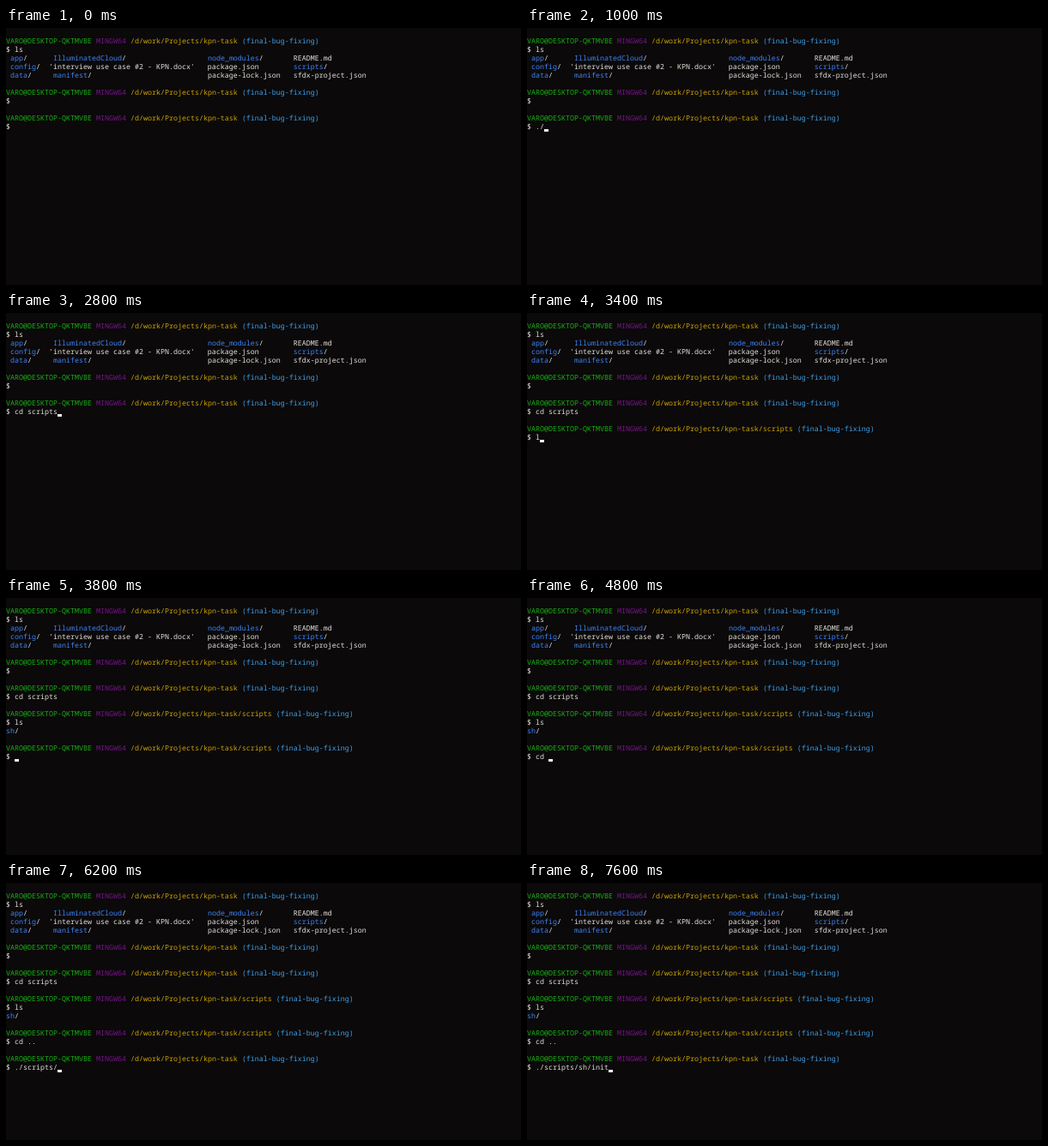
An HTML page that plays this animation: 600 px wide and 300 px high, repeating every 8000 ms.

```html
<!DOCTYPE html>
<html lang="en">
<head>
<meta charset="utf-8">
<title>Terminal session</title>
<style>
  html, body { margin: 0; width: 100%; height: 100%; overflow: hidden; background: #0b090a; }
  #term {
    position: absolute; left: 0; top: 11px; width: 600px; height: 289px; overflow: hidden;
    color: #e4e0da;
    font: 8.3333px/10px "Noto Sans Mono", "DejaVu Sans Mono", monospace;
    font-variant-ligatures: none;
    text-rendering: geometricPrecision;
    white-space: pre;
  }
  .user { color: #17b012; }
  .sys { color: #78158a; }
  .path { color: #cba406; }
  .branch { color: #409ee4; }
  .dir { color: #3f84f4; }
  #cursor { position: absolute; width: 5px; height: 3px; background: #f2f2f2; }
</style>
</head>
<body>
<div id="term"><div id="cursor"></div></div>
<script>
const STEP = 200, CELL = 5, ROW = 10;
const HOME = '/d/work/Projects/kpn-task';
const term = document.getElementById('term');
const cursor = document.getElementById('cursor');

const paint = (cls, text) => `<span class="${cls}">${text}</span>`;
const dir = (name, width = 0) => paint('dir', name) + '/'.padEnd(width - name.length);
const head = path => [
  paint('user', 'VARO@DESKTOP-QKTMVBE'), paint('sys', 'MINGW64'),
  paint('path', path), paint('branch', '(final-bug-fixing)')
].join(' ') + '\n';

const listing = [
  ' ' + dir('app', 10) + dir('IlluminatedCloud', 36) + dir('node_modules', 20) + 'README.md',
  ' ' + dir('config', 9) + "'interview use case #2 - KPN.docx'".padEnd(37) + 'package.json'.padEnd(20) + dir('scripts'),
  ' ' + dir('data', 10) + dir('manifest', 36) + 'package-lock.json'.padEnd(20) + 'sfdx-project.json'
].join('\n');

// Each prompt: text above the input, its row, and the input per step ("_" is the cursor).
const prompts = [
  {
    row: 10,
    before: head(HOME) + '$ ls\n' + listing + '\n\n' + head(HOME) + '$\n\n' + head(HOME),
    keys: ['', '_', '', '_', '._', './_', './s_', './sc_', './scr_', './scr',
           './_', 'c_', 'cd s_', 'cd scri_', 'cd scripts_']
  },
  { row: 13, before: '\n' + head(HOME + '/scripts'), keys: ['', '_', 'l_'], final: 'ls' },
  {
    row: 17,
    before: dir('sh') + '\n\n' + head(HOME + '/scripts'),
    keys: ['', '_', '', '_', 'c_', 'cd_', 'cd _', 'cd ._', 'cd .._']
  },
  {
    row: 20,
    before: '\n' + head(HOME),
    keys: ['', './_', './scr_', './script_', './scripts/_', './scripts/_',
           './scripts/s_', './scripts/sh_', './scripts/sh/_', './scripts/sh/i_',
           './scripts/sh/in_', './scripts/sh/init_', './scripts/sh/init_']
  }
];

let total = 0;
for (const p of prompts) {
  p.start = total;
  total += p.keys.length;
  p.final ??= p.keys.at(-1).replace('_', '');
  p.box = document.createElement('div');
  p.box.innerHTML = p.before + '$ <span></span>\n';
  p.input = p.box.lastElementChild;
  term.append(p.box);
}

function show(step) {
  for (const p of prompts) {
    const i = step - p.start;
    const active = i >= 0 && i < p.keys.length;
    const key = active ? p.keys[i] : p.final;
    const text = key.replace('_', '');
    p.box.style.display = i < 0 ? 'none' : 'block';
    p.input.textContent = text;
    if (active) {
      cursor.style.left = (2 + text.length) * CELL + 'px';
      cursor.style.top = p.row * ROW + 7 + 'px';
      cursor.style.visibility = key === text ? 'hidden' : 'visible';
    }
  }
}

const begin = performance.now();
let last = -1;
function tick() {
  const step = Math.floor((performance.now() - begin) / STEP) % total;
  if (step !== last) show(last = step);
  requestAnimationFrame(tick);
}
tick();
</script>
</body>
</html>
```
